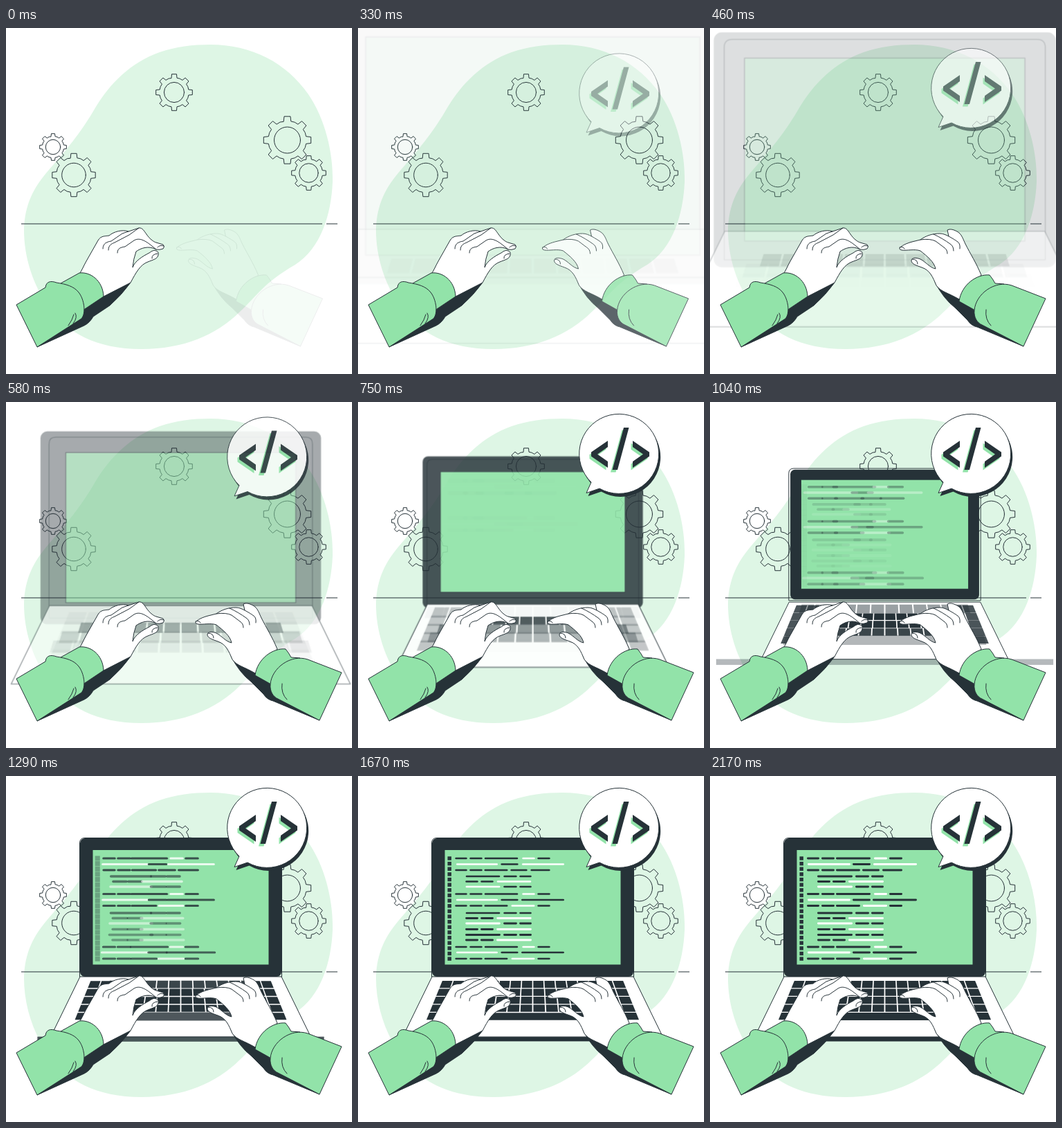
Animation of 500 by 500 pixels, one loop 2.21 s. Source, as an HTML page:

```html
<!DOCTYPE html>
<html lang="en">
<head>
<meta charset="utf-8">
<title>Typing on a laptop</title>
<style>
html, body { margin: 0; height: 100%; overflow: hidden; background: #fff; }
svg { display: block; width: 100vw; height: 100vh; }
.line { fill: none; stroke: #263238; stroke-linecap: round; stroke-linejoin: round; }
.ink { fill: #263238; }
.white { fill: #fff; }
.green { fill: #92e3a9; }
.edge { stroke: #263238; stroke-linejoin: round; }
.zoom { transform-box: fill-box; transform-origin: center; }
#laptop { transform-box: view-box; transform-origin: 252.5px 236.5px; }
</style>
</head>
<body>
<svg viewBox="0 0 500 500">
  <path fill="#def6e5" d="M295 24C355 24 405 50 437 96C461 131 473 180 472 222C470 270 455 318 418 342C370 370 365 385 338 410C304 444 256 464 196 464C130 464 88 440 62 404C38 370 26 330 26 292C27 255 40 230 62 205C92 171 112 145 128 117C150 80 180 50 222 35C245 27 270 24 295 24Z"/>
  <g id="gears" class="line"></g>
  <path class="line" stroke-width="1.2" style="stroke-linecap:butt" d="M22 283H457M463 283H479"/>

  <g id="laptop">
    <rect class="ink zoom" data-delay=".135" x="107" y="90" width="291" height="200" rx="7"/>
    <path class="line zoom" data-delay=".05" d="M106.5 290V97Q106.5 89.5 114 89.5H391Q398.5 89.5 398.5 97V290Z"/>
    <rect class="green edge zoom" data-delay=".05" x="125" y="106.5" width="255" height="166.5"/>
    <path class="white edge zoom" data-delay=".05" d="M107 290H398L440.5 377H64.5Z"/>
    <rect class="ink zoom" data-delay=".745" x="63.5" y="377" width="378" height="6.5"/>
  </g>

  <g class="edge">
    <path class="ink" d="M180 368L141 387 112 408 45 461 113 430Q121 426 126 417L150 401Q167 386 180 368Z"/>
    <path class="white" d="M105 357C110 350 112 344 116 337L133 307C137 300 143 301 149 300C156 294 168 291 177 294L192 289C197 288 200 294 203 298C207 304 213 309 217 310L227 313Q230 316 227 319Q222 321 217 320C206 314 195 318 188 323Q184 334 183 346C186 337 197 330 207 325Q213 320 217 322Q221 323 220 328C219 334 212 335 205 338C194 342 188 353 180 368L141 388Z"/>
    <path class="line" d="M140 319C140 311 146 309 152 308L168 297 177 294M148 321C148 314 152 312 157 310L178 299 192 289M161 325C161 318 166 317 172 316L185 307C195 301 206 311 217 320M219 326Q210 327 211 333M228 315Q222 313 219 317"/>
    <path class="green" d="M79 369L106 354C122 352 140 365 141 388L108 410Z"/>
    <path class="green" d="M15 400L57 375C58 366 65 365 73 368C86 370 98 373 105 382C113 392 116 412 109 420L45 461Z"/>
    <path class="line" d="M90 430Q96 422 98 414M97 427Q104 418 100 412"/>
  </g>

  <g id="hand" class="edge">
    <path class="ink" d="M325 367L361 390 384 410 453 460 386 432Q377 430 372 422L355 405Q337 391 325 367Z"/>
    <path class="white" d="M274 318C276 315 284 311 292 309L304 306C312 300 322 297 332 297C337 297 341 299 345 301L343 292C348 289 356 293 360 296C365 301 366 306 369 312C376 326 385 340 392 357L360 392C345 383 333 381 327 372C322 360 318 350 306 346C298 343 291 341 291 336C292 331 299 332 304 334C312 338 317 346 326 348C324 338 314 330 304 322C296 319 284 322 277 321Q273 320 274 318Z"/>
    <path class="line" d="M304 306Q318 304 326 308L338 317Q343 320 343 326M323 298C332 302 340 307 347 312Q352 315 352 322M345 301Q354 306 358 309Q362 312 361 319M274 317Q279 315 281 319M292 334Q300 334 300 341"/>
    <path class="green" d="M425 370L412 369Q409 363 404 357C386 355 363 371 360 395L385 409Z"/>
    <path class="green" d="M485 391L436 372C412 364 384 384 382 408C381 418 386 426 393 429L453 460Z"/>
    <path class="line" d="M399 407Q397 421 406 430"/>
  </g>

  <g id="bubble">
    <use href="#balloon" class="ink" x="2.5" y="4.5"/>
    <use href="#balloon" class="white edge"/>
    <use href="#tag" class="green" x="-2.5" y="3.5"/>
    <use href="#tag" class="ink"/>
  </g>
  <defs>
    <path id="balloon" d="M330 131.5L337 116A57.5 57.5 0 1 1 349 125Z"/>
    <path id="tag" d="M361 56V65L346 75.5 361 86V95L337 78.5V72.5ZM384 37H391.5L375 98H367.5ZM397 56V65L412 75.5 397 86V95L421 78.5V72.5Z"/>
  </defs>
</svg>
<script>
const $ = id => document.getElementById(id);
const LOOP = 2210, STEP = 41.7, ZOOM = 1.1;

function add(parent, name, attrs) {
  const el = document.createElementNS('http://www.w3.org/2000/svg', name);
  for (const k in attrs) el.setAttribute(k, attrs[k]);
  return parent.appendChild(el);
}

// Gears: centre and outer radius
for (const [x, y, r] of [[243, 93, 26.5], [68, 172, 19.5], [98, 212.5, 31.5], [406.5, 162, 34.5], [437.5, 209.5, 25]]) {
  const pts = [];
  for (let i = 0; i < 8; i++)
    for (const [deg, k] of [[-11, .8], [-7.5, 1], [7.5, 1], [11, .8], [22.5, .81]]) {
      const a = (i * 45 + deg) * Math.PI / 180;
      pts.push((x + r * k * Math.sin(a)).toFixed(1) + ',' + (y - r * k * Math.cos(a)).toFixed(1));
    }
  add($('gears'), 'polygon', {points: pts.join(' ')});
  add($('gears'), 'circle', {cx: x, cy: y, r: r * .55});
}

// Keyboard: each row has a middle block and two side blocks
const laptop = $('laptop');
const keyX = (f, y) => 252.5 + (f - .5) * (262 + (y - 295) * .82);
const quad = (a, b, top, bottom) =>
  `M${keyX(a, top)} ${top}L${keyX(b, top)} ${top} ${keyX(b, bottom)} ${bottom} ${keyX(a, bottom)} ${bottom}Z`;

function keys(from, to, top, bottom, delay) {
  let d = '';
  for (let i = from; i < to; i++) d += quad((i + .05) / 16, (i + .95) / 16, top, bottom);
  add(laptop, 'path', {class: 'ink zoom', d, 'data-delay': delay});
}
[.68, .16, .35, .43].forEach((delay, row) => {
  const top = 296 + row * 11.5;
  keys(2, 14, top, top + 10.3, delay);
});
for (let row = 0; row < 5; row++) {
  const top = 296 + row * 11.5;
  keys(0, 2, top, top + 10.3, .48);
  keys(14, 16, top, top + 10.3, .48);
}
add(laptop, 'path', {class: 'ink zoom', d: quad(.13, .87, 342, 353), 'data-delay': .74});

// Code on the screen: start and end of each dash, a negative start is white
const dashes = {
  a: [140, 158, 161, 180, 182, 232, -237, 256, 259, 278],
  b: [-141, 203, 206, 232, -236, 299],
  c: [-141, 203, 206, 232, 235, 299],
  d: [140, 158, 161, 180, 182, 217, 220, 245, 249, 278],
  e: [140, 158, 161, 180, 182, 217, -221, 256, 259, 278],
  f: [155, 206, 210, 230, 233, 251],
  g: [155, 174, 177, 196, -200, 251],
  h: [-155, 206, 210, 230, 233, 251]
};
const rows = [
  [119, 'a', .73], [127.5, 'b', .74], [136, 'd', .71], [145, 'f', .86], [152.5, 'g', .85], [160, 'h', .89],
  [170.5, 'a', .73], [179, 'c', .74], [187.5, 'e', .73], [198, 'f', .87], [205.5, 'g', .92], [213, 'h', .93],
  [221.5, 'g', .94], [229.5, 'f', .95], [237, 'g', .96], [247, 'a', .78], [255, 'c', .79], [264, 'e', .78]
];
for (const [y, type, delay] of rows) {
  const p = dashes[type];
  for (let i = 0; i < p.length; i += 2) {
    const x = Math.abs(p[i]);
    add(laptop, 'rect', {
      class: (p[i] < 0 ? 'white' : 'ink') + ' zoom',
      x, y: y - 1.4, width: p[i + 1] - x, height: 2.8, rx: 1.4, 'data-delay': delay
    });
  }
}
for (let i = 0; i < 20; i++)
  add(laptop, 'rect', {class: 'ink zoom', x: 129.5, y: 116.3 + i * 7.64, width: 5.4, height: 5.4, 'data-delay': .98});

const clamp = v => Math.min(1, Math.max(0, v));

// cubic-bezier(.36, -.01, .5, 1.38)
function overshoot(x) {
  const curve = (s, p, q) => 3 * (1 - s) ** 2 * s * p + 3 * (1 - s) * s * s * q + s ** 3;
  let lo = 0, hi = 1;
  for (let i = 0; i < 20; i++) {
    const mid = (lo + hi) / 2;
    if (curve(mid, .36, .5) < x) lo = mid; else hi = mid;
  }
  return curve(hi, -.01, 1.38);
}

function pose(el, opacity, transform) {
  el.setAttribute('opacity', clamp(opacity));
  el.setAttribute('transform', transform);
}

function zoom(el, t, delay) {
  const p = clamp((t - delay) / ZOOM), v = p && p < 1 ? overshoot(p) : p;
  pose(el, v, `scale(${1.5 - .5 * v})`);
}

function slide(el, t, delay, dx, dy) {
  const p = clamp((t - delay) / .5);
  pose(el, p, `translate(${dx * (1 - p)} ${dy * (1 - p)})`);
}

const parts = [...document.querySelectorAll('.zoom')].map(el => [el, +el.dataset.delay]);
const start = performance.now();

function draw() {
  const ms = (performance.now() - start) % LOOP;
  const t = (Math.floor((ms + 10) / STEP) + 1) / 24;
  zoom(laptop, t, .13);
  for (const [el, delay] of parts) zoom(el, t, delay);
  slide($('hand'), t, 0, -30, 0);
  slide($('bubble'), t, .2, 0, 30);
  requestAnimationFrame(draw);
}
draw();
</script>
</body>
</html>
```
